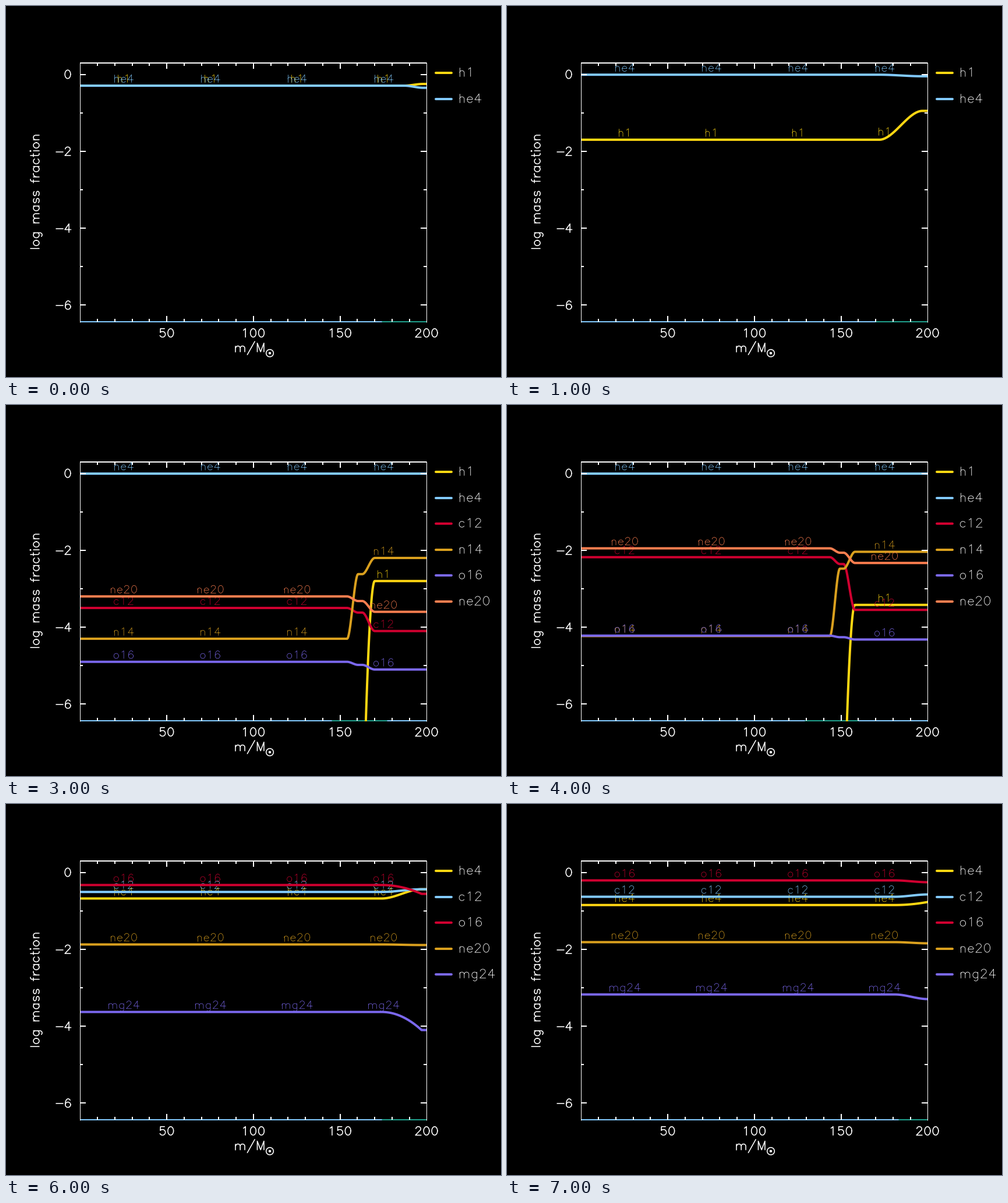
A matplotlib script that plays this animation: 850 by 638 pixels, repeating every 8000 ms.

```python
import numpy as np
import matplotlib.pyplot as plt
from matplotlib.animation import ArtistAnimation
from matplotlib.collections import LineCollection
from matplotlib.patches import Circle, Rectangle

W, H, DPI = 850, 638, 64
PT = 72 / DPI
LEFT, RIGHT, TOP, BOTTOM = 127.5, 722.5, 98, 542.5
ZERO_Y, UNIT_X, UNIT_Y = 117.5, 2.975, 66.15
FLOOR = -6.43
COLORS = ["#ffd712", "#82caff", "#d00030", "#daa01e", "#7b68ee", "#ff7f50"]
MIXED = "#1fa08c"
MASS = np.linspace(0, 200, 1001)

fig = plt.figure(figsize=(W / DPI, H / DPI), dpi=DPI, facecolor="black")
ax = fig.add_axes([0, 0, 1, 1])
ax.set(xlim=(0, W), ylim=(H, 0))
ax.axis("off")
plot_area = Rectangle((128, 97), 594, 447, fill=False, lw=0)
ax.add_patch(plot_area)


def to_x(mass):
    return LEFT + mass * UNIT_X


def to_y(value):
    return ZERO_Y - value * UNIT_Y


# --- single-stroke lettering: capitals 21 units high, small letters 14 ---

def arc(cx, cy, rx, ry, start=0, end=360):
    a = np.radians(np.linspace(start, end, 17))
    return list(zip(cx + rx * np.cos(a), cy + ry * np.sin(a)))


def stem(x, top, bottom=0):
    return [(x, top), (x, bottom)]


def arch(x):
    return arc(x + 5.5, 8.5, 5.5, 5.5, 170, 0) + [(x + 11, 0)]


bowl = arc(9.5, 7, 6.5, 7, 35, 325)
crossbar = [(2, 14), (9, 14)]

# character: (advance, strokes)
GLYPHS = {
    " ": (16, []),
    "-": (26, [[(7, 9), (24, 9)]]),
    "/": (22, [[(20, 25), (2, -7)]]),
    "0": (20, [arc(10, 10.5, 7, 10.5)]),
    "1": (20, [[(6, 17), (11, 21), (11, 0)]]),
    "2": (20, [arc(10, 15.5, 6, 5.5, 175, -30) + [(3, 0), (17, 0)]]),
    "4": (20, [[(13, 0), (13, 21), (3, 7), (18, 7)]]),
    "5": (20, [[(15, 21), (5, 21)] + arc(10, 7, 7, 7, 140, -155)]),
    "6": (20, [arc(10.5, 6.5, 6.5, 6.5), arc(11, 9, 7, 12, 45, 185)]),
    "M": (24, [[(4, 0), (4, 21), (12, 0), (20, 21), (20, 0)]]),
    "a": (19, [bowl, stem(15, 14)]),
    "c": (18, [bowl]),
    "e": (18, [[(3, 8)] + arc(9.5, 7, 6.5, 7, 8, 325)]),
    "f": (12, [arc(9, 17, 4, 4, 75, 180) + [(5, 0)], crossbar]),
    "g": (19, [bowl, [(15, 14)] + arc(10, -2, 5, 5, 0, -140)]),
    "h": (19, [stem(4, 21), arch(4)]),
    "i": (8, [arc(4, 21, 1, 1), stem(4, 14)]),
    "l": (8, [stem(4, 21)]),
    "m": (30, [stem(4, 14), arch(4), arch(15)]),
    "n": (19, [stem(4, 14), arch(4)]),
    "o": (19, [arc(9.5, 7, 6.5, 7)]),
    "r": (13, [stem(4, 14), arc(11, 7, 7, 7, 180, 80)]),
    "s": (17, [arc(8.5, 10.5, 5.3, 3.5, 25, 270) + arc(8.5, 3.5, 5.5, 3.5, 90, -155)]),
    "t": (12, [[(5, 21)] + arc(9, 4, 4, 4, 180, 285), crossbar]),
}


def strokes(text, x, y, size, align=0.0, upright=False):
    """Strokes of a text; align 0, 0.5 or 1 sets left, centre or right."""
    pen = -align * sum(GLYPHS[c][0] for c in text)
    out = []
    for c in text:
        advance, parts = GLYPHS[c]
        for part in parts:
            u, v = np.array(part, float).T * size
            u = u + pen * size
            out.append(np.column_stack((x - v, y - u) if upright else (x + u, y - v)))
        pen += advance
    return out


def draw(segments, color, width, z, cap="round", clip=False):
    lines = LineCollection(segments, colors=color, linewidths=width * PT,
                           capstyle=cap, joinstyle="round", zorder=z)
    ax.add_collection(lines, autolim=False)
    if clip:
        lines.set_clip_path(plot_area)
    return lines


# --- axes ---

def draw_axes():
    draw([[(x, TOP - 1), (x, BOTTOM + 1)] for x in (LEFT, RIGHT)], "white", 1, 1, "butt")
    draw([[(LEFT, y), (RIGHT, y)] for y in (TOP, BOTTOM)], "white", 2, 1, "butt")
    ticks, labels = [], []
    for m in range(10, 200, 10):
        x, size = to_x(m), 10 if m % 50 == 0 else 5
        ticks += [[(x, TOP), (x, TOP + size)], [(x, BOTTOM), (x, BOTTOM - size)]]
    for m in range(50, 201, 50):
        labels += strokes(str(m), to_x(m) - 0.5, 569.5, 0.7, 0.5)
    for p in range(0, -7, -1):
        y, size = to_y(p), 5 if p % 2 else 10
        ticks += [[(LEFT, y), (LEFT + size, y)], [(RIGHT, y), (RIGHT - size, y)]]
        if p % 2 == 0:
            labels += strokes(str(p), 113, y + 7.3, 0.7, 1)
    labels += strokes("log mass fraction", 57, 420, 0.714, upright=True)
    labels += strokes("m/M", 391.5, 594.7, 0.714)
    draw(ticks, "white", 2, 5, "butt")
    draw(labels, "white", 1.6, 1)
    ax.add_patch(Circle((453, 597), 6.3, fill=False, ec="white", lw=1.6 * PT))
    ax.add_patch(Circle((453, 597), 2.2, color="white", lw=0))


# --- abundance profiles: a core level that turns into a surface level ---

def smooth(t):
    t = np.clip(t, 0, 1)
    return t * t * (3 - 2 * t)


def bend(t):
    return t ** 2


def stairs(t):
    return t - np.sin(8 * np.pi * t) / (8 * np.pi)


def late(t):
    return 1 - (1 - np.clip(3 * t - 2, 0, 1)) ** 2


def shelf(k):
    """Two smooth steps with a rest at the fraction k between them."""
    return lambda t: k * smooth(t / 0.4) + (1 - k) * smooth((t - 0.55) / 0.45)


def level(core, surface=None, ease=smooth, edge=0):
    """Profile over mass; the species is absent below the edge."""
    surface = core if surface is None else surface

    def profile(start, end):
        t = np.clip((MASS - start) / (end - start), 0, 1)
        return np.where(MASS < edge, -9, core + (surface - core) * ease(t))
    return profile


# transition zone, mixed zone on the lower axis (both in mass), species
STAGES = [
    ((187, 198), (174, 200), {
        "h1": level(-0.295, -0.25), "he4": level(-0.295, -0.35)}),
    ((172, 197), (170, 200), {
        "h1": level(-1.7, -0.95), "he4": level(-0.01, -0.05)}),
    ((178, 197), (165, 198), {
        "h1": level(-4.77, -1.25, stairs, edge=170.5), "he4": level(0, -0.03, bend),
        "c12": level(-4.79, -7.4, bend), "n14": level(-4.52, -6.7, bend),
        "ne20": level(-5.1, -8, bend)}),
    ((154, 170), (145, 177), {
        "h1": level(-6.7, -2.8, late), "he4": level(0),
        "c12": level(-3.5, -4.1, shelf(0.2)), "n14": level(-4.3, -2.2, shelf(0.8)),
        "o16": level(-4.9, -5.1, shelf(0.4)), "ne20": level(-3.2, -3.6, shelf(0.3))}),
    ((143.5, 158), (129, 160), {
        "h1": level(-6.7, -3.42, late), "he4": level(0),
        "c12": level(-2.18, -3.55, shelf(0.13)), "n14": level(-4.23, -2.04, shelf(0.8)),
        "o16": level(-4.22, -4.32, shelf(0.4)), "ne20": level(-1.95, -2.33, shelf(0.3))}),
    ((190, 200), (176, 198), {
        "he4": level(-0.12), "c12": level(-0.665), "o16": level(-1.59),
        "ne20": level(-1.89), "mg24": level(-5.37)}),
    ((174, 197), (174, 200), {
        "he4": level(-0.68, -0.44), "c12": level(-0.51, -0.44),
        "o16": level(-0.33, -0.56, bend), "ne20": level(-1.875, -1.89),
        "mg24": level(-3.63, -4.1, bend)}),
    ((181, 200), (183, 200), {
        "he4": level(-0.85, -0.77, bend), "c12": level(-0.635, -0.575),
        "o16": level(-0.21, -0.257), "ne20": level(-1.815, -1.845),
        "mg24": level(-3.175, -3.295)}),
]


def stage_artists(zone, mixed, species):
    artists = [
        draw([[(to_x(a), BOTTOM), (to_x(b), BOTTOM)]], color, 3, z, "butt", True)
        for (a, b), color, z in (((0, 200), COLORS[1], 2), (mixed, MIXED, 2.1))
    ]
    for i, (name, profile) in enumerate(species.items()):
        color, z, values = COLORS[i], 3 + i / 10, profile(*zone)
        labels = []
        for m in (25, 75, 125, 175):
            value = np.interp(m, MASS, values)
            if value > FLOOR:
                labels += strokes(name, to_x(m), to_y(value) - 5.7, 0.633, 0.5)
        key_y = np.floor(115.5 + 44.5 * i)
        artists += [
            draw([np.column_stack((to_x(MASS), to_y(values)))], color, 4, z, "butt", True),
            draw(labels, color, 0.7, z + 0.05),
            draw([[(738, key_y), (765.5, key_y)]], color, 4, 2),
            draw(strokes(name, 776, key_y + 6.2, 0.725), "white", 0.85, 2),
        ]
    return artists


draw_axes()
anim = ArtistAnimation(fig, [stage_artists(*s) for s in STAGES],
                       interval=1000, repeat=True, repeat_delay=0)
plt.show()
```
